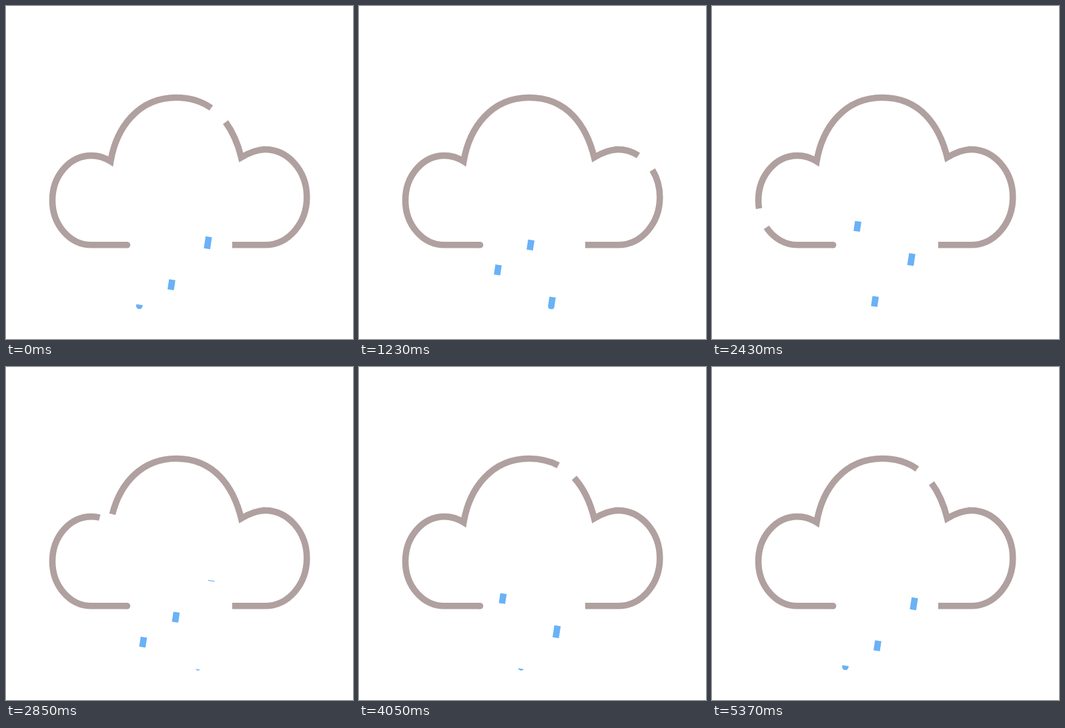
Recreate the animation shown at these times as an HTML page with a canvas. Size 520x500 px, loop 5.4 s.

```html
<!DOCTYPE html>
<html lang="en">
<head>
<meta charset="utf-8">
<title>Rain cloud</title>
<style>
  html, body { margin: 0; width: 100%; height: 100%; overflow: hidden; background: #fff; }
  canvas { display: block; }
</style>
</head>
<body>
<canvas id="stage" width="520" height="500"></canvas>
<script>
const ctx = document.getElementById('stage').getContext('2d');
const { PI } = Math;
const LOOP = 5400, STEP = 30, WIDTH = 9.6;
const CYCLE = LOOP - STEP;          // the last step repeats the first pose
const CLOUD = '#b0a0a0', RAIN = '#6ab1f7';
const LEFT = 181.5, BASE = 358.8;   // rounded lower left end of the outline

// Cloud outline, clockwise from the lower left end
const outline = new Path2D();
outline.moveTo(LEFT, BASE);
outline.lineTo(128, BASE);
outline.ellipse(128, 291.7, 58.5, 67.1, 0, PI / 2, PI * 1.5 + 0.515);
outline.bezierCurveTo(165.3, 183, 198, 137.5, 255, 137.5);
outline.bezierCurveTo(312, 137.5, 340.7, 179.5, 352.5, 227.3);
outline.bezierCurveTo(362, 221.8, 375, 215.5, 388, 215.5);
outline.ellipse(388, 287.1, 62.8, 71.7, 0, -PI / 2, PI / 2);
outline.lineTo(339, BASE);
const GAP = { size: 30.5, start: 502, lap: 1012, time: 4430 };

// Rain lanes: lower end, first drop centre along the lane, drop length
const LANES = [
  { x: 199.8, y: 450.3, at: 5.7, size: 15.2 },
  { x: 243, y: 451, at: -32.9, size: 15.2 },
  { x: 288, y: 451, at: -96.6, size: 18.2 }
];
const LANE_LENGTH = 132, SLANT = 0.151, SPACING = 152, FALLS = 7;

const lane = new Path2D();
lane.rect(-WIDTH / 2, -LANE_LENGTH, WIDTH, LANE_LENGTH);
lane.arc(0, 0, WIDTH / 2, 0, PI);

// Cubic ease in and out with control points (0.455, 0) and (0.494, 1)
function ease(u) {
  if (u >= 1) return 1;
  let lo = 0, hi = 1;
  for (let i = 0; i < 24; i++) {
    const p = (lo + hi) / 2, q = 1 - p;
    const x = 3 * q * q * p * 0.455 + 3 * q * p * p * 0.494 + p ** 3;
    if (x < u) lo = p; else hi = p;
  }
  return lo * lo * (3 - 2 * lo);
}

function drawCloud(t) {
  const { size, start, lap, time } = GAP;
  const centre = (start + lap * ease(t / time)) % lap;
  ctx.strokeStyle = ctx.fillStyle = CLOUD;
  ctx.lineWidth = WIDTH;
  ctx.setLineDash([lap - size, size]);
  ctx.lineDashOffset = -(centre + size / 2);
  ctx.stroke(outline);
  if (Math.min(centre, lap - centre) > size / 2) {
    ctx.beginPath();
    ctx.arc(LEFT, BASE, WIDTH / 2, 0, PI * 2);
    ctx.fill();
  }
}

function drawRain(t) {
  const fall = t / CYCLE * FALLS % 1 * SPACING;
  ctx.fillStyle = RAIN;
  for (const { x, y, at, size } of LANES) {
    ctx.save();
    ctx.translate(x, y);
    ctx.rotate(SLANT);
    ctx.clip(lane);
    for (const shift of [0, SPACING]) {
      ctx.fillRect(-WIDTH, at + fall - shift - size / 2, WIDTH * 2, size);
    }
    ctx.restore();
  }
}

const begin = performance.now();
function frame() {
  const now = Math.max(0, performance.now() - begin) % LOOP;
  const t = Math.floor(now / STEP) * STEP;
  ctx.fillStyle = '#fff';
  ctx.fillRect(0, 0, 520, 500);
  drawCloud(t);
  drawRain(t);
  requestAnimationFrame(frame);
}
frame();
</script>
</body>
</html>
```
